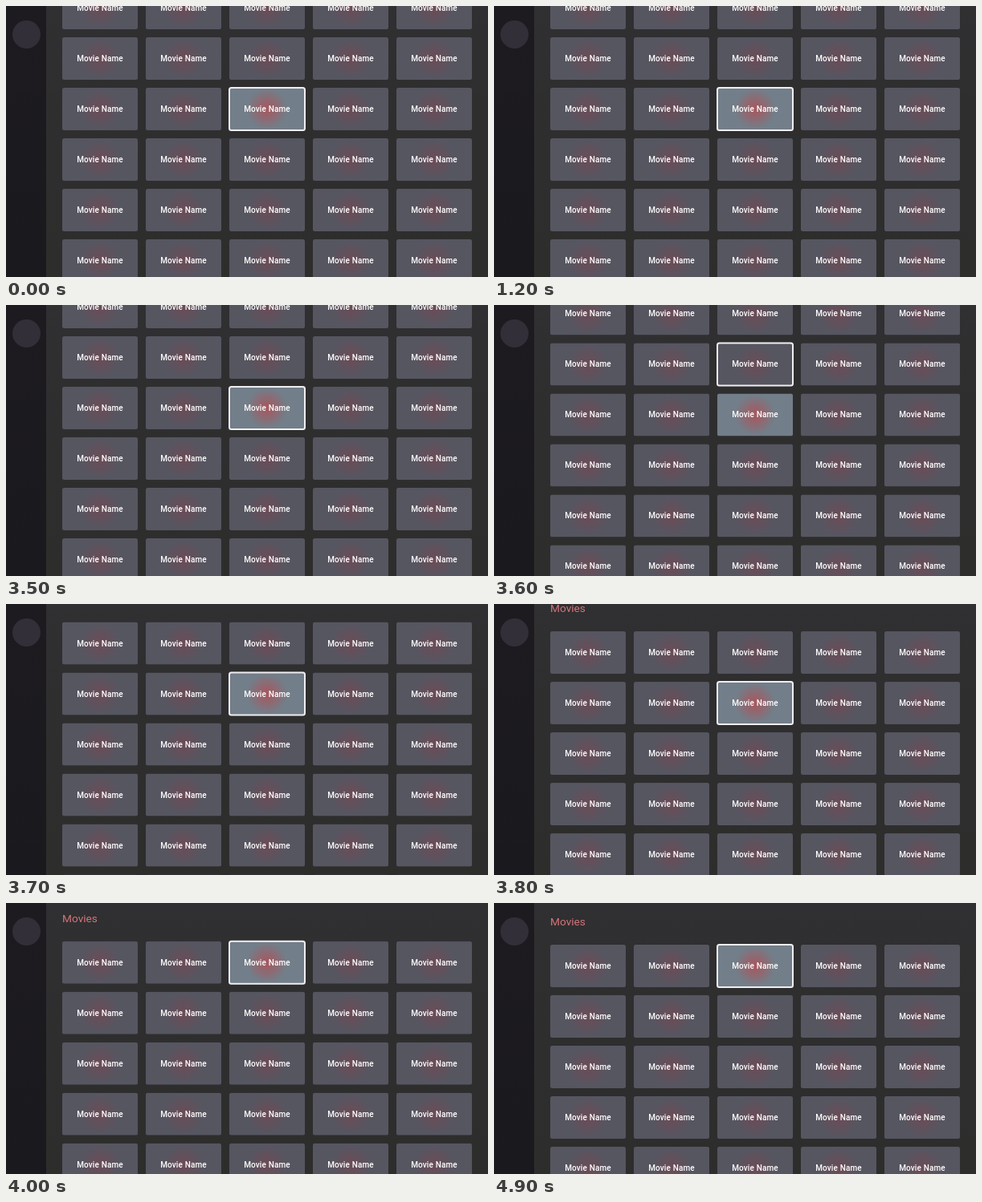
Animation of 600x338 px, one loop 5000 ms. Source, as an HTML page:

```html
<!DOCTYPE html>
<html lang="en">
<head>
<meta charset="utf-8">
<title>Movie grid</title>
<style>
  html, body { margin: 0; width: 100%; height: 100%; overflow: hidden; }
  body { position: relative; background: linear-gradient(#302f31, #2d2d2c); font-family: Roboto, sans-serif; }
  #side { position: absolute; left: 0; top: 0; width: 50px; height: 100%; background: linear-gradient(#1d1b20, #1a191d); }
  #side::before { content: ""; position: absolute; left: 7.5px; top: 17.5px; width: 35px; height: 35px; border-radius: 50%; background: #322f38; }
  #page { position: absolute; left: 0; top: 0; }
  h1 { position: absolute; left: 70px; top: 13px; margin: 0; font: 400 13.7px/20px Roboto, sans-serif; color: #d2757c; }
  .card {
    position: absolute; width: 94px; height: 53px; border-radius: 2.5px;
    background: radial-gradient(circle 25px, rgba(145, 58, 68, .38), rgba(145, 58, 68, .2) 45%, rgba(145, 58, 68, 0)) #565661;
    color: #fff; font-size: 10px; font-weight: 500; line-height: 53px; letter-spacing: .14px; text-align: center;
  }
  .fill { background: radial-gradient(circle 25px, rgba(190, 70, 75, .7), rgba(190, 70, 75, .4) 45%, rgba(190, 70, 75, 0)) #727e89; }
  .ring::after { content: ""; position: absolute; inset: -1px; border: 2px solid #f0edf1; border-radius: 3.5px; box-sizing: border-box; }
</style>
</head>
<body>
<div id="page"><h1>Movies</h1></div>
<div id="side"></div>
<script>
const LOOP = 5000, STEP = 100, COLS = 5, ROWS = 6, PITCH = 63;
const page = document.getElementById("page");
const cards = [];

for (let i = 0; i < ROWS * COLS; i++) {
  const card = document.createElement("div");
  card.className = "card";
  card.textContent = "Movie Name";
  card.style.left = 70 + (i % COLS) * 104 + "px";
  card.style.top = 51.5 + Math.floor(i / COLS) * PITCH + "px";
  page.append(card);
  cards.push(card);
}

const settle = (from, to, elapsed) => to + (from - to) * Math.exp(-0.012 * elapsed);

function scrollAt(t) {
  if (t < 3588) return 76;
  if (t <= 3900) return settle(76, 13, t - 3588);
  return t < 4400 ? settle(14.5, 0, t - 3900) : 0;
}

// The ring moves up first; the fill follows one step later.
const focusRow = t => t < 3600 ? 2 : t < 3900 ? 1 : 0;

function draw(now) {
  const t = Math.floor(now % LOOP / STEP) * STEP;
  const ring = focusRow(t), fill = focusRow(t - STEP * (t > 0));
  page.style.transform = `translateY(${-scrollAt(t)}px)`;
  for (let row = 0; row < 3; row++) {
    const { classList } = cards[row * COLS + 2];
    classList.toggle("ring", row === ring);
    classList.toggle("fill", row === fill);
  }
  requestAnimationFrame(draw);
}
draw(0);
</script>
</body>
</html>
```
